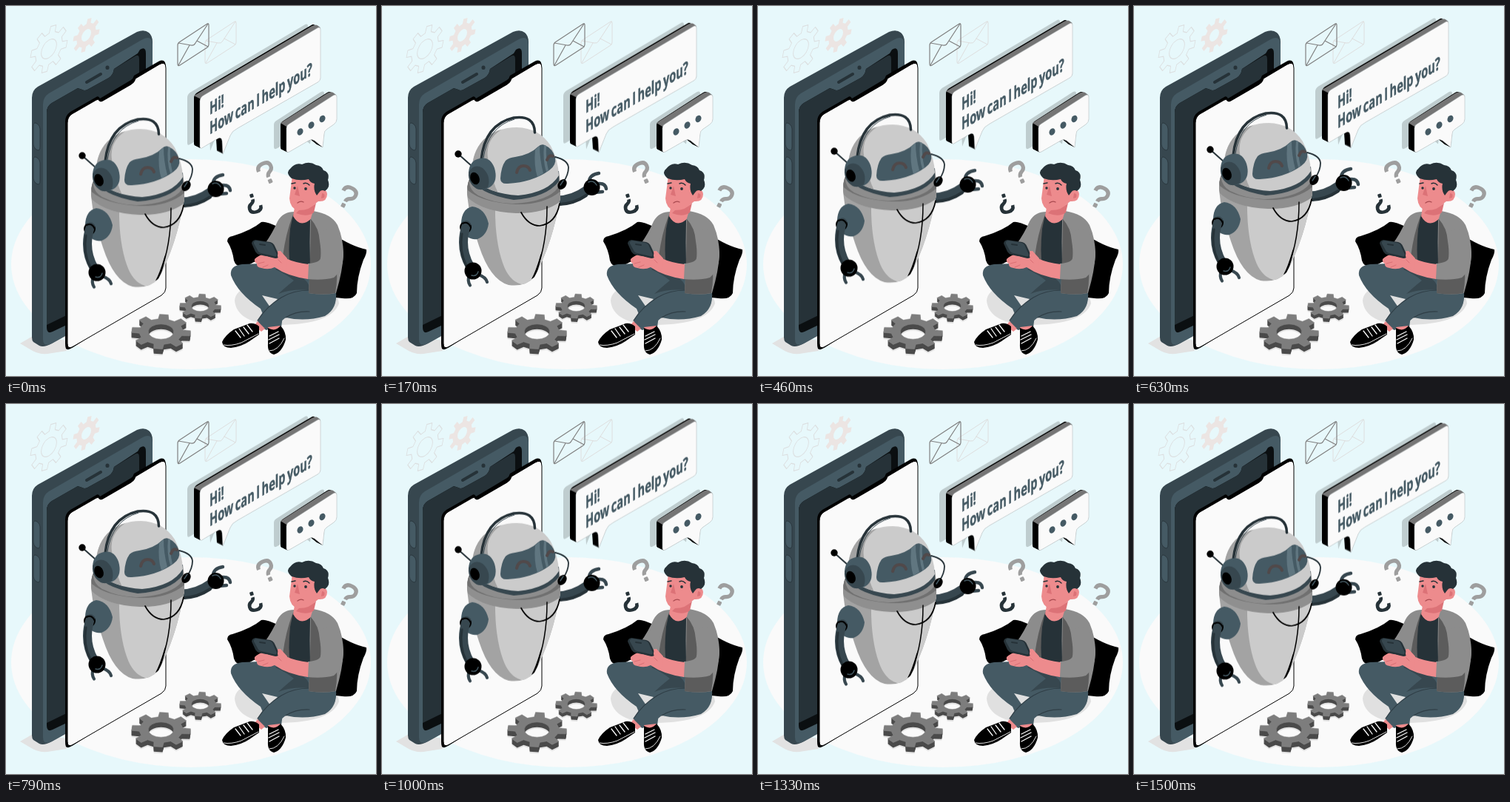
An HTML page that plays this animation: 500 px wide and 500 px high, repeating every 1.54 s.

```html
<!DOCTYPE html>
<html lang="en">
<head>
<meta charset="utf-8">
<title>Chatbot</title>
<style>
  html, body { margin: 0; width: 100%; height: 100%; overflow: hidden; background: #e7f8fb; }
  svg { display: block; width: 100vw; height: 100vh; }
  .float { animation: float 1540ms linear -60ms infinite; }
  @keyframes float { 50% { transform: translateY(-10px); } }
  .line { fill: none; stroke-linecap: round; stroke-linejoin: round; }
  .say { font: 700 23.5px "Open Sans", "Noto Sans", sans-serif; word-spacing: -2px; fill: #455a64; stroke: #455a64; stroke-width: .5; }
  .front { fill: #fafafa; stroke: #a8b0b2; stroke-width: .5; }
</style>
</head>
<body>
<svg viewBox="0 0 500 500" xmlns="http://www.w3.org/2000/svg">
  <defs>
    <path id="big" d="M262 129Q262 125 266 122L420 31Q425 28 425 33V98Q425 102 421 104L313 166Q305 170 303 176L293 201L292 183Q291 177 286 180L266 192Q262 195 262 190Z"/>
    <path id="small" d="M379 165Q379 161 383 159L442 121Q447 118 447 123V153Q447 157 443 160L433 167Q430 169 430 173L428 191L417 182Q413 179 409 182L383 197Q379 199 379 195Z"/>
    <path id="panel" d="M83 158Q83 150 89 146L122 127Q125 125 126 128Q128 130 131 128L169 106Q174 103 175 98L207 79Q216 74 216 84V381Q216 387 210 391L91 460Q83 465 83 456Z"/>
    <g id="mail" class="line">
      <path d="M234 49L272 24Q274 23 274 26V52Q274 54 272 56L235 80Q232 82 232 78V53Q232 51 234 49Z"/>
      <path d="M233 50L250 53Q254 54 256 50L273 24M233 80L248 53M273 55L258 47"/>
    </g>
    <g id="ask">
      <path class="line" style="stroke-linecap:butt" stroke-width="5.2" d="M-9-4Q-9-12 0-12Q9-12 9-5Q9 0 4 2Q0 4 0 8"/>
      <rect x="-2.800" y="11" width="5.600" height="5.600" rx="1"/>
    </g>
    <path id="body" d="M122 230Q114 241 115 258Q118 290 131 327Q146 373 171 380Q194 383 206 369Q230 325 241 262V243L232 228Z"/>
    <path id="head" d="M122 236Q119 203 137 184Q155 167 182 167Q213 168 228 192Q238 211 239 232Q225 255 184 259Q145 257 122 236Z"/>
    <clipPath id="inBody"><use href="#body"/></clipPath>
    <clipPath id="inHead"><use href="#head"/></clipPath>
  </defs>

  <ellipse cx="250" cy="349" rx="243" ry="142" fill="#fafafa"/>
  <g id="wallGears"></g>

  <use href="#mail" x="37" y="-3" stroke="#dedede"/>
  <use href="#mail" stroke="#808080" stroke-width="1.200"/>

  <!-- phone -->
  <path fill="#e2e2e2" d="M19 456L38 445L82 452V466L56 470Q45 471 36 466Z"/>
  <path fill="#37474f" d="M35 124Q35 114 43 109L177 35Q187 31 193 36Q198 40 198 49V380L62 456Q51 462 45 459L37 454Q35 452 35 448Z"/>
  <path fill="#455a64" d="M50 133Q50 123 58 118L183 46Q197 38 198 52V380L62 456Q50 462 50 450Z"/>
  <path fill="#0b0f11" d="M55 144Q55 135 62 131L97 111L103 113Q106 115 110 113L139 97Q145 93 146 85L178 64L181 59Q189 54 189 64V380L63 440Q55 444 55 434Z"/>
  <path fill="#263238" d="M55 144Q55 135 62 131L97 111L103 113Q106 115 110 113L139 97Q145 93 146 85L174 68Q180 64 180 72V370L55 431Z"/>
  <g class="line" stroke="#263238">
    <path stroke-width="4" d="M109 103L128 92"/>
    <path stroke-width="5" d="M137 83V83.5"/>
  </g>
  <g fill="#455a64" stroke="#263238" stroke-width=".8">
    <path d="M37 162Q37 156 42 159Q46 162 46 166V190Q46 197 41 194Q37 191 37 187Z"/>
    <path d="M37 208Q37 202 42 205Q46 208 46 212V236Q46 243 41 240Q37 237 37 233Z"/>
  </g>
  <path d="M80 156Q80 148 87 143L122 123Q125 121 127 125L169 100Q172 98 173 94L206 75Q216 70 216 83V381L91 461Q83 466 81 463Q80 461 80 456Z"/>
  <use href="#panel" fill="#fafafa" stroke="#000"/>

  <g id="floorGears"></g>

  <!-- large bubble -->
  <g class="float">
    <use href="#big" x="-17" y="-4.500" fill="#bfcdcf"/>
    <g id="bigSide"></g>
    <path fill="#757575" d="M254 122L413 28Q418 25 421 27L425 30L266 122L262 126Z"/>
    <use href="#big" class="front"/>
    <g class="say">
      <text transform="matrix(.62 -.362 0 1 275 148)">Hi!</text>
      <text transform="matrix(.62 -.362 0 1 275 174.500)">How can I help you?</text>
    </g>
  </g>

  <!-- small bubble -->
  <use href="#small" x="-17" y="-4.500" fill="#bfcdcf"/>
  <g id="smallSide"></g>
  <path fill="#757575" d="M371 158L434 118Q439 115 442 117L446 120L383 159L379 163Z"/>
  <use href="#small" class="front"/>
  <g fill="#455a64">
    <ellipse rx="3.800" ry="5" transform="translate(397.500 170) rotate(25)"/>
    <ellipse rx="3.800" ry="5" transform="translate(412.500 161) rotate(25)"/>
    <ellipse rx="3.800" ry="5" transform="translate(427.500 152.500) rotate(25)"/>
  </g>

  <g stroke-width="0">
    <use href="#ask" fill="#9e9e9e" stroke="#9e9e9e" transform="translate(351.500 224) rotate(-24)"/>
    <use href="#ask" fill="#263238" stroke="#263238" transform="translate(335.500 268) rotate(163) scale(.88)"/>
    <use href="#ask" fill="#9e9e9e" stroke="#9e9e9e" transform="translate(462 257) rotate(27)"/>
  </g>

  <!-- robot -->
  <g class="float">
    <path class="line" stroke="#37474f" stroke-width="13" stroke-linecap="butt" d="M236 266Q258 266 277 252"/>
    <path class="line" stroke="#263238" stroke-width="4" d="M240 271Q260 270 276 259"/>
    <g class="line" stroke="#37474f" stroke-width="4.500">
      <path d="M280 241Q280 231 293 229"/>
      <path d="M292 243Q302 242 303 250M287 255L298 254"/>
    </g>
    <circle cx="283.500" cy="248" r="11"/>
    <path class="line" stroke="#455a64" stroke-width="1.500" d="M279 241Q286 238 290 245"/>

    <use href="#body" fill="#a3a3a3"/>
    <g clip-path="url(#inBody)">
      <path fill="#cbcbcb" d="M153 270Q152 318 163 350Q171 374 188 379L215 385L250 262Z"/>
      <path fill="#8f8f8f" d="M110 225H245V264Q222 284 181 283Q136 281 116 262Z"/>
      <path fill="#707070" d="M110 225H245V250Q222 272 181 271Q136 269 116 252Z"/>
      <path class="line" stroke="#000" stroke-width="1.500" d="M223 274Q223 325 208 362"/>
      <path d="M214 340Q208 361 202 372L207 370Q214 352 216 335Z"/>
    </g>
    <path class="line" stroke="#000" stroke-width="1.700" d="M188 282Q198 300 213 300Q235 297 240 270"/>

    <path fill="#8d8d8d" d="M118 240Q118 252 130 259Q158 273 190 269Q232 264 241 243L239 226Z"/>
    <path fill="#37474f" d="M122 234Q126 256 178 265Q222 262 239 240V226Z"/>
    <use href="#head" fill="#cbcbcb"/>
    <path clip-path="url(#inHead)" fill="#a3a3a3" d="M110 165H170Q139 180 143 208Q148 240 160 262H110Z"/>
    <path fill="#455a64" d="M160 236Q161 220 167 212Q171 208 180 207Q200 204 211 193Q215 189 220 191Q231 196 234 208Q236 218 226 225Q204 241 170 243Q160 244 160 236Z"/>
    <path fill="#607680" d="M207 197L213 192Q213 210 218 229L210 234Q205 219 207 197ZM219 191L222 192Q221 210 225 225L222 227Q217 211 219 191Z"/>
    <g class="line" stroke="#51494a" stroke-width="4">
      <path d="M182 228Q184 219 191 219Q198 219 200 225"/>
      <path d="M223 211Q226 203 231 206"/>
    </g>
    <path class="line" stroke="#263238" stroke-width="3.500" d="M134 211Q139 163 178 154Q206 150 206.500 174"/>
    <path class="line" stroke="#37474f" stroke-width="1" d="M137 209Q143 166 179 156"/>

    <path class="line" stroke="#263238" stroke-width="2" d="M103 203L121 219"/>
    <circle cx="103" cy="203" r="4.700"/>
    <path fill="#455a64" d="M117 228Q118 212 132 209Q146 206 152 222Q157 239 147 247Q138 253 128 250Z"/>
    <path fill="#37474f" d="M117 228Q124 215 136 222Q148 233 143 248Q136 253 128 250Q116 243 117 228Z"/>
    <ellipse rx="6" ry="8.500" fill="#000" transform="translate(125.500 236) rotate(-22)"/>

    <path class="line" stroke="#263238" stroke-width="1.800" d="M234 207Q251 211 252 221Q252 231 245 241"/>
    <ellipse rx="5.500" ry="7.500" fill="#000" transform="translate(243.500 244) rotate(34)"/>
    <path class="line" stroke="#455a64" stroke-width="1.500" d="M241 245L245 239"/>

    <path fill="#455a64" d="M107 296Q108 277 122 274Q139 276 144 297Q142 313 129 318Q115 320 107 304Z"/>
    <circle cx="113" cy="302" r="8" fill="#000"/>
    <path class="line" stroke="#37474f" stroke-width="12" stroke-linecap="butt" d="M114 299Q104 329 119 355"/>
    <path class="line" stroke="#263238" stroke-width="3" d="M108 311Q104 334 114 354"/>
    <path class="line" stroke="#000" stroke-width="2" d="M109 297Q116 293 120 302"/>
    <g class="line" stroke="#37474f" stroke-width="4.200">
      <path d="M118 367Q115 374 119 380.500"/>
      <path d="M130 366Q140 369 142 376"/>
    </g>
    <circle cx="123" cy="361" r="11.500"/>
    <path class="line" stroke="#455a64" stroke-width="1.500" d="M121 367Q128 369 130 362"/>
  </g>

  <!-- man -->
  <path fill="#e0e0e0" d="M309 398Q312 430 370 431Q440 430 450 402Q447 374 390 372Q312 370 309 398Z"/>
  <path d="M299 318Q299 312 306 311Q332 303 345 292Q350 290 369 299L375 338L335 346Q313 359 308 344Q306 329 299 318Z"/>
  <path d="M440 307Q467 325 487 329Q488 334 483 343Q474 367 474 388Q470 397 455 395Q430 393 415 388Z"/>
  <path fill="#8c8c8c" d="M390 278Q374 278 367 291Q360 307 350 321Q353 333 366 334L382 349L396 290Z"/>
  <path fill="#5c5c5c" d="M387 284Q378 308 374 338L384 349L392 290Z"/>
  <path fill="#263238" d="M388 282Q398 287 417 282L418 350L384 352Q381 332 384 301Z"/>
  <path fill="#ed8b8d" d="M391 266L388 284Q398 302 414 286L417 262Z"/>

  <path fill="#455a64" d="M304 364Q302 351 319 349L372 347L410 355L411 385L376 404L372 434Q361 441 353 431L344 409Q313 388 304 364Z"/>
  <path fill="#e0e0e0" d="M346 391L367 396L357 407Z"/>
  <path fill="#455a64" d="M409 384L446 387Q448 409 431 419Q404 427 378 421Q364 433 352 438Q342 434 340 425Q352 406 372 394Q388 384 409 384Z"/>
  <path fill="#37474f" d="M369 352L393 364Q409 369 411 384Q386 382 368 389Q380 378 389 371Q378 362 364 356Z"/>
  <path class="line" stroke="#2f3e46" stroke-width="1.200" d="M411 384Q388 384 372 394Q352 406 340 425M378 421Q392 412 410 413"/>

  <path fill="#8c8c8c" d="M415 277Q440 281 448 296Q456 315 456 335Q455 358 446 388Q430 391 409 388L411 348Q410 319 411 290Z"/>
  <path fill="#5c5c5c" d="M412 288Q423 300 424 318Q428 343 421 350L446 351Q449 365 445 388Q427 391 409 388L411 342Z"/>
  <path fill="#8c8c8c" d="M427 304Q452 293 456 334Q456 356 443 367Q429 371 407 369L408 348Q425 347 426 339Z"/>
  <path fill="#ed8b8d" d="M409 349Q391 347 378 341L369 331Q364 331 367 338L351 334Q341 337 336 342Q335 346 339 348Q338 353 345 354Q355 357 363 353Q380 365 408 369Z"/>
  <path fill="#263238" d="M332 321Q332 317 337 316L357 319Q361 320 363 324L369 337Q369 341 364 341L342 336Q339 335 337 332Z"/>
  <path fill="#37474f" d="M335 321Q334 317 339 317L356 320Q360 321 361 325L366 336Q366 339 362 338L345 334Q341 333 340 330Z"/>
  <path class="line" stroke="#263238" stroke-width="2" d="M343 322L350 323"/>
  <path fill="#ed8b8d" d="M367 338Q367 330 371 331L380 341L379 355L362 351L347 341Q349 337 355 339L369 344Z"/>
  <path class="line" stroke="#d96f74" stroke-width="1" d="M341 348L349 346M347 353L354 350M368 343L372 347"/>

  <path fill="#ed8b8d" d="M387 229L383 260Q384 273 394 276Q409 278 418 267L422 264Q434 265 434 254Q433 247 426 249L421 229Z"/>
  <path fill="#dc7277" d="M396 276Q411 276 419 266L416 279Q407 286 392 280Z"/>
  <path fill="#263238" d="M386 233Q377 225 384 220Q391 211 400 214Q410 209 419 215Q427 216 429 222Q438 225 435 235Q439 245 431 250Q426 247 423 252L420 256Q415 249 417 240Q411 239 409 234Q397 237 386 233Z"/>
  <path fill="#dc7277" d="M394 243L390 255L397 257ZM427 253Q432 253 430 259L426 260Z"/>
  <g class="line" stroke="#263238" stroke-width="1.500">
    <path d="M386 240L391 239M402 240Q406 238 410 242"/>
    <path stroke="#a94a50" stroke-width="1.300" d="M394 266Q398 263 402 265"/>
  </g>
  <circle cx="390" cy="246" r="1.700" fill="#263238"/>
  <circle cx="405" cy="247" r="1.900" fill="#263238"/>

  <path fill="#ed8b8d" d="M340 426L350 436L345 440L335 432ZM354 434L371 432L368 443L355 442Z"/>
  <path d="M342 433Q336 428 329 429Q319 433 308 437Q296 445 292 454Q293 462 304 462Q319 460 329 453L342 444Z"/>
  <path d="M354 435Q364 441 371 432Q379 441 378 451Q373 468 362 471Q353 469 354 456Z"/>
  <g class="line" stroke="#fafafa" stroke-width="1.300">
    <path d="M310 439L317 448M315 436L322 446M321 434L328 443M326 431L333 440M356 446L368 440M355 451L369 444M356 456L369 449"/>
    <path stroke-width=".9" d="M294 458Q304 460 318 455L341 443M356 466Q368 466 376 449"/>
  </g>
</svg>
<script>
  const el = id => document.getElementById(id);

  // Closed outline with n trapezoid teeth and a round hole.
  function gear(n, r, root, hole, turn = 0) {
    const step = 2 * Math.PI / n;
    const at = (rad, a) => (rad * Math.cos(a)).toFixed(2) + ' ' + (rad * Math.sin(a)).toFixed(2);
    const pts = [];
    for (let i = 0; i < n; i++) {
      const a = turn + i * step;
      pts.push(at(root, a - step * .29), at(r, a - step * .19), at(r, a + step * .19), at(root, a + step * .29));
    }
    return `M${pts.join('L')}ZM${hole} 0A${hole} ${hole} 0 1 0 ${-hole} 0A${hole} ${hole} 0 1 0 ${hole} 0Z`;
  }

  const shape = (d, matrix, attrs) =>
    `<path d="${d}" transform="matrix(${matrix})" fill-rule="evenodd" stroke-linejoin="round" ${attrs}/>`;

  el('wallGears').innerHTML =
    shape(gear(8, 29, 21, 12, .25), '.866 -.5 0 1 58 58', 'fill="none" stroke="#dcdfe0" stroke-width="1.1"') +
    shape(gear(8, 21, 15, 7.5, .25), '.866 -.5 0 1 108.5 39.5', 'fill="#ece5e3"');

  function floorGear(x, y, r, depth) {
    const d = gear(8, r, r * .74, r * .43, .1);
    const layer = (dy, attrs) => shape(d, `1 0 0 .59 ${x} ${y + dy}`, attrs);
    let out = layer(depth + 2, 'fill="#e2e2e2"');
    for (let dy = depth; dy > 0; dy--) out += layer(dy, 'fill="#4a4a4a"');
    return out + layer(0, 'fill="#7d7d7d" stroke="#8f8f8f" stroke-width=".6"');
  }
  el('floorGears').innerHTML = floorGear(209.5, 440, 40, 7) + floorGear(262.5, 405.5, 28, 5);

  // Solid side of a bubble, swept from back to front.
  function sweep(id, ref) {
    let out = '';
    for (let i = 16; i > 0; i--) out += `<use href="#${ref}" x="${-i / 2}" y="${-i / 4}"/>`;
    el(id).innerHTML = out;
  }
  sweep('bigSide', 'big');
  sweep('smallSide', 'small');
</script>
</body>
</html>
```
